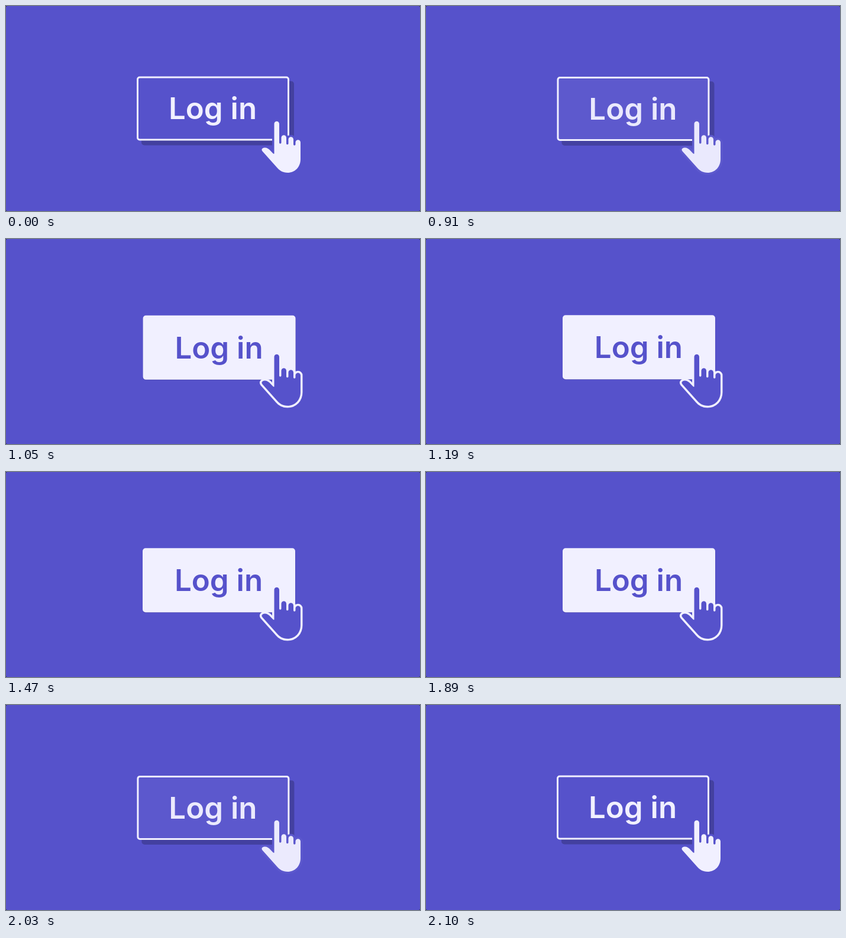
An HTML page that plays this animation: 700 by 348 pixels, repeating every 2.66 s.

```html
<!DOCTYPE html>
<html lang="en">
<head>
<meta charset="utf-8">
<title>Log in button</title>
<style>
  html, body { margin: 0; width: 100%; height: 100%; overflow: hidden; background: #24224f; }
  svg { display: block; width: 700px; height: 348px; }
  text { font: 600 51px Inter, "Liberation Sans", sans-serif; text-anchor: middle; }
</style>
</head>
<body>
<svg viewBox="0 0 700 348">
  <rect width="700" height="348" rx="2.5" fill="#5652cb"/>
  <g id="button">
    <rect id="shadow" x="229" y="127.5" width="258" height="109" rx="5" fill="#43409f"/>
    <rect id="edge" x="221" y="120.3" width="258.3" height="109" rx="5" fill="#3f3b9c"/>
    <rect id="face" x="222.5" y="121" width="255" height="106" rx="3.5" stroke="#f1f0ff" stroke-width="3"/>
    <text id="label" x="349.5" y="192.4">Log in</text>
  </g>
  <path id="hand" stroke-width="7" stroke-linejoin="round" paint-order="stroke" d="
    M453.5 250 V200 a4.25 4.25 0 0 1 8.5 0
    V232 a1.75 1.75 0 0 0 3.5 0 V223.5 a4.25 4.25 0 0 1 8.5 0
    V233.5 a1.75 1.75 0 0 0 3.5 0 V226.5 a4.25 4.25 0 0 1 8.5 0
    V235 a1.75 1.75 0 0 0 3.5 0 V231.5 a4.25 4.25 0 0 1 8.5 0
    V260 C498 273 489 283 476 283 C468 283 462 279 458 274
    L433.5 246.5 C430.8 243 434 240.5 438 240.5 C441 240.5 443 242 445 243.5
    L451.5 250.3 Q453.5 252 453.5 250 Z"/>
</svg>
<script>
const LOOP = 2660, STEP = 70;
const PRESS = 898, RELEASE = 1898, RELEASE_TIME = 165;
const BASE = [86, 82, 203], LIGHT = [241, 240, 255];
const $ = id => document.getElementById(id);
const [button, shadow, edge, face, label, hand] =
  ["button", "shadow", "edge", "face", "label", "hand"].map($);

const clamp = v => Math.min(1, Math.max(0, v));
const mix = (a, b, k) => `rgb(${a.map((v, i) => Math.round(v + (b[i] - v) * k))})`;

// Slightly underdamped spring from 0 to 1
function spring(t) {
  const damp = 0.018, freq = 0.02;
  return 1 - Math.exp(-damp * t) * (Math.cos(freq * t) + damp / freq * Math.sin(freq * t));
}

function pressed(t) {
  if (t < PRESS) return 0;
  if (t < RELEASE) return spring(t - PRESS);
  return (1 - clamp((t - RELEASE) / RELEASE_TIME)) ** 2;
}

function draw(now) {
  const t = Math.floor(now % LOOP / STEP) * STEP;
  const p = pressed(t), k = clamp(p);
  const surface = mix(BASE, LIGHT, k), ink = mix(LIGHT, BASE, k);
  button.setAttribute("transform", `translate(${10 * p} ${9.8 * p})`);
  shadow.setAttribute("opacity", 1 - k);
  edge.setAttribute("opacity", k * k * 0.6);
  face.setAttribute("fill", surface);
  label.setAttribute("fill", ink);
  hand.setAttribute("fill", ink);
  hand.setAttribute("stroke", surface);
}

const start = performance.now();
function tick() {
  draw(performance.now() - start);
  requestAnimationFrame(tick);
}
tick();
</script>
</body>
</html>
```
